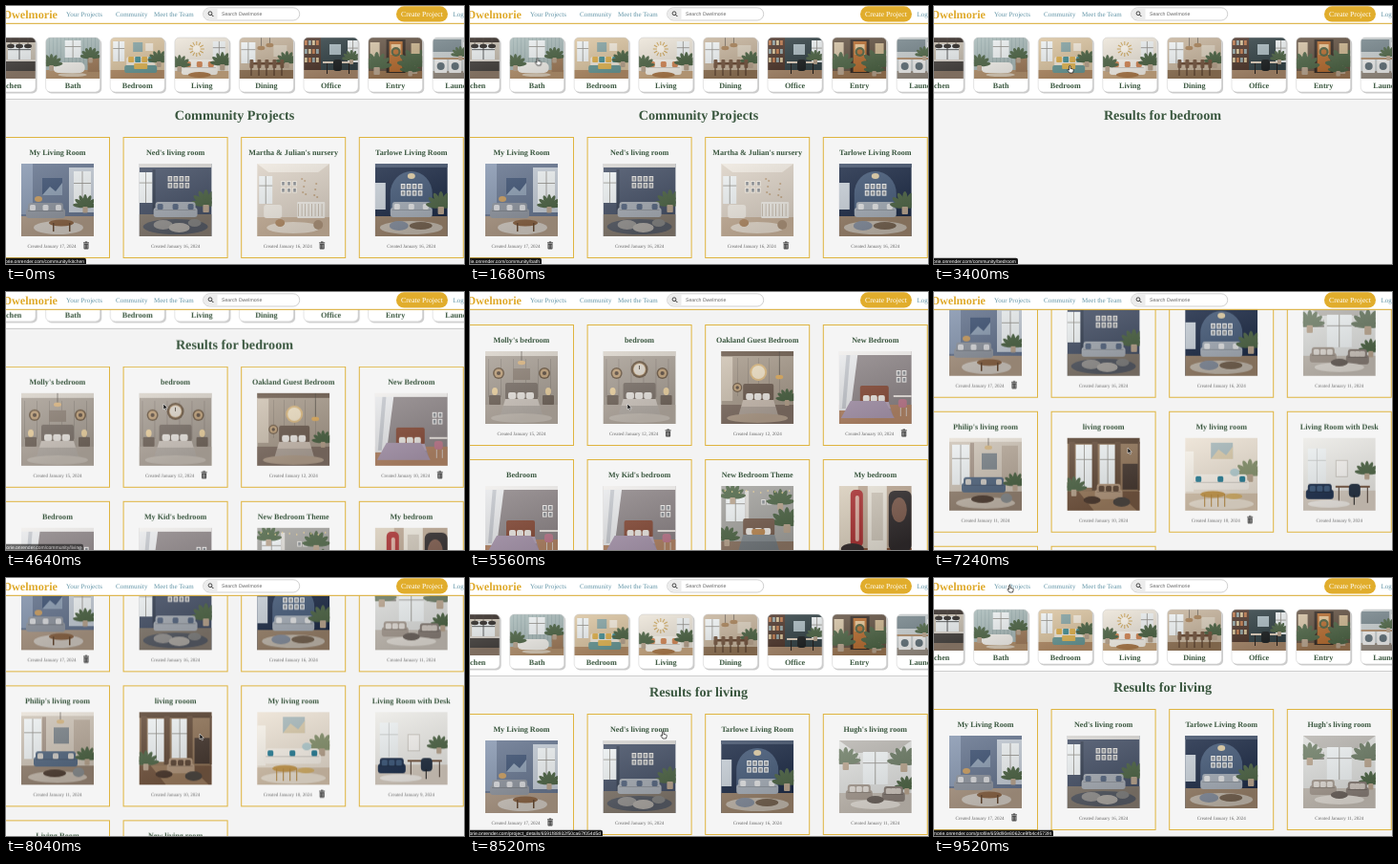
Write an HTML page that moves like this. It is 480x270 px and loops after 10000 ms.

```html
<!DOCTYPE html>
<html lang="en">
<head>
<meta charset="utf-8">
<title>Dwelmorie</title>
<style>
html, body { margin: 0; width: 100%; height: 100%; overflow: hidden; background: #f3f3f3; }
#stage { display: block; width: 480px; height: 270px; }
text { font-family: "Liberation Serif", serif; text-rendering: geometricPrecision; }
.sans { font-family: "Liberation Sans", sans-serif; }
.bold { font-weight: 700; }
.mid { text-anchor: middle; }
.end { text-anchor: end; }
.green { fill: #3a573f; }
.nav { font-size: 7px; fill: #6496a8; }
#page { animation: scroll 10s linear infinite; }
#cursor { animation: point 10s ease-in-out infinite; }
@keyframes scroll {
  0%, 43.2% { transform: translateY(0); }
  46.4% { transform: translateY(-59px); animation-timing-function: ease-out; }
  50%, 56.2% { transform: translateY(-103px); animation-timing-function: ease-in-out; }
  60.5%, 69.6% { transform: translateY(0); animation-timing-function: ease-in; }
  72.4% { transform: translateY(-153px); animation-timing-function: ease-out; }
  76%, 78% { transform: translateY(-215px); animation-timing-function: ease-in; }
  83.8% { transform: translateY(0); animation-timing-function: ease-out; }
  85.2% { transform: translateY(5px); animation-timing-function: ease-out; }
  87.5%, 100% { transform: translateY(0); }
}
@keyframes point {
  0%, 4.8% { transform: translate(-6px, 62px); }
  16% { transform: translate(70px, 58px); }
  24% { transform: translate(140px, 66px); }
  32%, 37.5% { transform: translate(143px, 66px); }
  40.2% { transform: translate(186px, 70px); }
  43.5%, 58.5% { transform: translate(165px, 118px); }
  62%, 66.5% { transform: translate(203px, 60px); }
  69.3%, 88% { transform: translate(203px, 164px); }
  94%, 100% { transform: translate(80px, 11px); }
}
</style>
</head>
<body>
<svg id="stage" viewBox="0 0 480 270"></svg>
<script>
const R = (x, y, w, h, fill, r = 0) =>
  `<rect x="${x}" y="${y}" width="${w}" height="${h}" rx="${r}" fill="${fill}"/>`;
const E = (x, y, rx, ry, fill) =>
  `<ellipse cx="${x}" cy="${y}" rx="${rx}" ry="${ry}" fill="${fill}"/>`;
const P = (d, fill) => `<path d="${d}" fill="${fill}"/>`;
const T = (x, y, size, cls, s, fill) =>
  `<text x="${x}" y="${y}" font-size="${size}" class="${cls}"${fill ? ` fill="${fill}"` : ''}>${s}</text>`;
const times = (n, f) => Array.from({ length: n }, (_, i) => f(i)).join('');

// Furniture
const room = (wall, floor, y) => R(0, 0, 76, 76, wall) + R(0, y, 76, 76 - y, floor);
const win = (x, y, w, h, bar = '#8d8a84') => R(x, y, w, h, '#eef2f3') +
  R(x + w / 2 - .4, y, .8, h, bar) + R(x, y + h / 3, w, .8, bar);
const sofa = (x, y, w, fill, pillow) => R(x, y, w, 10, fill, 3) + R(x - 2, y + 6, w + 4, 10, fill, 3) +
  R(x, y + 8, w, .8, '#0003') + times(3, i => R(x + 2 + i * (w - 10) / 2, y + 2, 6, 6, pillow, 1.5));
const plant = (x, y, s, fill = '#4f6647') => times(7, i => {
  const a = Math.PI * (1.05 + i * .15);
  return `<ellipse rx="${s / 2}" ry="${s / 6}" fill="${fill}" transform="translate(${x + Math.cos(a) * s / 2},${y + Math.sin(a) * s / 2}) rotate(${a * 57.3})"/>`;
}) + R(x - s / 5, y, s / 2.5, s / 2, '#b9a58f', 1);
const frames = (x, y, cols, rows, fill = '#e5e3df') => times(cols * rows, i => {
  const fx = x + i % cols * 6, fy = y + Math.floor(i / cols) * 7;
  return R(fx, fy, 4.6, 5.6, fill) + R(fx + 1, fy + 1, 2.6, 3.6, '#8b8f94');
});
const bed = (x, y, w, head, cover) => R(x, y, w, 18, head, 2) +
  times(3, i => R(x + 3 + i * (w - 6) / 3, y + 10, (w - 9) / 3, 7, '#eeeae5', 2)) +
  P(`M${x} ${y + 17}H${x + w}L${x + w + 5} ${y + 34}H${x - 5}Z`, cover) +
  P(`M${x - 2} ${y + 24}H${x + w + 2}L${x + w + 5} ${y + 34}H${x - 5}Z`, '#0002');
const lamp = (x, y, len, fill) => R(x - .3, y, .6, len, '#4b443d') + E(x, y + len, 4, 2.2, fill);
const disc = (x, y, r) => E(x, y, r, r, '#6d5a46') + E(x, y, r * .75, r * .75, '#c0a27c') + E(x, y, r * .35, r * .35, '#5f5044');

const guest = room('#90888a', '#b7896a', 56) + P('M0 0H20L12 62H0Z', '#e9eaec') + P('M8 0H12L7 60H3Z', '#c5c8ce') +
  R(0, 0, 76, 4, '#f0eeec') + frames(60, 20, 2, 2, '#f4f2f0') + bed(22, 36, 30, '#8a4f3c', '#b9a9be') +
  P('M12 52H48L58 70H2Z', '#ad9bb2') + R(57, 46, 19, 2, '#efe9e4') + R(62, 50, 9, 9, '#c47f93', 3) + R(64, 59, 1, 9, '#d8cdc6') + R(70, 59, 1, 9, '#d8cdc6');
const grand = round => room('#aaa197', '#b8aea4', 56) + R(0, 0, 76, 5, '#d9d3ca') +
  times(6, i => R(3 + i * 13, 8, .7, 40, '#8f867d')) + disc(14, 23, 6) + disc(62, 23, 6) + round +
  bed(21, 33, 34, '#80766e', '#d5cdc5') + R(4, 46, 12, 10, '#776b61', 1) + R(60, 46, 12, 10, '#776b61', 1) +
  E(10, 42, 3, 4, '#f0d6a5') + E(66, 42, 3, 4, '#f0d6a5') + E(38, 70, 32, 5, '#cbc3ba');

const scenes = {
  blue: room('#66758f', '#ad9986', 55) + R(0, 0, 12, 53, '#8797b0') + R(50, 4, 26, 47, '#c4ccd6') + win(55, 8, 18, 36) +
    R(22, 15, 21, 18, '#3e5273') + P('M22 33L30 24L36 29L43 20V33Z', '#8b9cb1') + sofa(7, 41, 37, '#8f959f', '#d8d9dc') +
    plant(67, 45, 13) + E(39, 67, 26, 7, '#d1cac2') + E(42, 62, 13, 3.5, '#8b6546') + R(33, 62, 1.5, 9, '#654932') + R(50, 62, 1.5, 9, '#654932') + E(18, 37, 4, 3, '#c69a5d'),
  dark: room('#465167', '#83796e', 53) + R(0, 0, 76, 4, '#d6d4d1') + win(0, 9, 14, 32) + R(14, 6, 3, 47, '#343e50') +
    frames(30, 13, 4, 2) + plant(70, 43, 16) + sofa(17, 40, 42, '#a7adb5', '#566680') + E(38, 66, 34, 8, '#575c66') +
    E(25, 64, 10, 5, '#999795') + E(42, 67, 11, 5, '#b0aca7') + E(58, 62, 7, 4, '#858584'),
  nursery: room('#dcd2c6', '#c8b29b', 56) + win(2, 13, 14, 29) + P('M0 0H76L64 9H12Z', '#eee8df') + frames(25, 18, 3, 2, '#f5efe5') +
    times(9, i => E(47 + i * 13 % 25, 16 + i * 17 % 20, 1.1, 1.1, '#c0a482')) + R(42, 40, 29, 17, '#f1eee8', 1) +
    times(8, i => R(43 + i * 3.5, 42, .8, 13, '#c4b6a5')) + R(7, 43, 19, 14, '#f0ebe3', 3) + E(38, 67, 28, 6, '#e7ddd0') + E(24, 62, 5, 4, '#b38d68') + E(64, 64, 5, 5, '#ad947b'),
  arch: room('#1e2c47', '#98816a', 55) + R(0, 0, 76, 4, '#42516a') + P('M16 50V31A22 23 0 0 1 60 31V50Z', '#465b79') +
    R(0, 20, 11, 28, '#c8d0d8') + frames(27, 21, 4, 2, '#f2f2f0') + E(38, 13, 4, 3, '#dbc9a2') + sofa(18, 40, 40, '#a6aeb8', '#e1e2e3') +
    plant(69, 45, 16) + E(38, 67, 33, 7, '#c2b9ad') + E(25, 65, 10, 5, '#858e9d') + E(48, 65, 12, 4, '#776553'),
  loft: room('#dedfdd', '#c5beb5', 55) + P('M0 0H76L58 13H18Z', '#b8b5b0') + win(25, 12, 26, 34) + R(0, 23, 22, 2, '#8d8983') + R(54, 23, 22, 2, '#8d8983') +
    times(9, i => R(1 + i * 2.5, 17, .5, 7, '#8d8983')) + plant(7, 23, 16, '#718069') + plant(68, 24, 18, '#6b7a64') + plant(71, 50, 13) +
    sofa(9, 46, 24, '#a69b91', '#e2ddd7') + sofa(47, 48, 20, '#897f78', '#d2cac2') + E(38, 67, 26, 5, '#e4dfd8') + E(38, 62, 9, 4, '#6e655f'),
  panel: room('#cfc5b8', '#988675', 56) + R(0, 0, 76, 4, '#e8e1d7') + win(3, 7, 18, 42) + R(22, 5, 4, 48, '#a7978a') + R(55, 8, 17, 36, '#b9ab9c') +
    R(34, 16, 16, 17, '#7d858b') + lamp(41, 0, 10, '#d1b27e') + sofa(15, 41, 42, '#566a83', '#d1cdc7') + plant(69, 49, 13) + E(38, 68, 31, 6, '#c9beb1') + E(35, 64, 12, 4, '#544338') + E(60, 63, 6, 5, '#8c9092'),
  tall: room('#92765a', '#765842', 56) + R(0, 0, 76, 6, '#56402f') + win(9, 7, 18, 45) + win(34, 7, 17, 45) + times(4, i => R(2 + i * 24, 4, 6, 51, '#634b39')) +
    P('M12 56H52L73 76H28Z', '#bfa07b88') + R(58, 27, 16, 27, '#483a32') + sofa(31, 48, 25, '#b59a80', '#604a3a') + plant(7, 54, 14) + E(26, 65, 9, 4, '#4e3b30') + E(57, 67, 9, 5, '#4f4944'),
  cream: room('#ece2d4', '#d7c5ae', 58) + R(27, 5, 23, 17, '#a8b9bb') + P('M27 22L35 12L43 18L50 9V22Z', '#d7c8a8') + R(0, 14, 9, 42, '#f8f3ea') +
    plant(68, 38, 16, '#87936e') + sofa(9, 38, 56, '#f7f1e8', '#287e96') + E(38, 69, 34, 6, '#eee4d5') + E(29, 59, 13, 3.5, '#c89a4d') +
    times(4, i => R(20 + i * 7, 59, 1, 13, '#b98a41')) + E(51, 61, 9, 3, '#d8b36b') + E(52, 36, 5, 4, '#b3cdd0'),
  desk: room('#ecebe7', '#d9cfc3', 55) + win(5, 11, 19, 36, '#c2c5c4') + R(34, 23, 13, 18, '#cbc7c0') + R(35, 24, 11, 16, '#f7f5f2') +
    plant(67, 37, 13) + sofa(5, 48, 25, '#1e304d', '#3b5779') + R(34, 50, 36, 2, '#765742') + R(37, 52, 1, 16, '#4b3c33') + R(67, 52, 1, 16, '#4b3c33') +
    R(48, 48, 12, 14, '#263345', 4) + R(53, 60, 1, 10, '#222') + E(27, 69, 22, 4, '#f3efea'),
  clock: grand(disc(38, 19, 9) + E(38, 19, 6, 6, '#ded7cc') + R(37.6, 15, .8, 4, '#40372f') + E(40, 66, 15, 6, '#c9c0b7')),
  medal: grand(lamp(38, 0, 12, '#dcb782') + R(29, 18, 18, 12, '#91857a')),
  sun: room('#a99c8d', '#837267', 56) + R(0, 0, 76, 5, '#6b5a4c') + R(0, 6, 12, 46, '#d0c4b4') + times(5, i => R(17 + i * 11, 7, .6, 40, '#8b7f74')) +
    disc(17, 38, 5) + E(39, 22, 9, 9, '#d9b77e') + E(39, 22, 7, 7, '#eee0c4') + lamp(61, 0, 27, '#dfac5d') + bed(23, 34, 32, '#6e5d51', '#cec1b5') + E(38, 70, 32, 5, '#b6a390') + plant(69, 51, 12),
  guest,
  theme: room('#a5a4a0', '#8e7765', 58) + win(5, 9, 20, 28) + R(25, 5, 4, 45, '#dfdcd7') + frames(42, 14, 2, 1) + plant(12, 12, 14) + plant(62, 18, 15) + plant(69, 40, 18) +
    times(10, i => E(4 + i * 7.5, 5 + i % 3, .8, .8, '#f5d893')) + bed(23, 34, 33, '#785f50', '#868d91') + R(32, 45, 14, 6, '#bd8b56', 2) + plant(6, 56, 14),
  closet: room('#b8a490', '#7c5138', 65) + R(0, 0, 20, 76, '#d8cdbb') + R(12, 4, 13, 60, '#a62e2f', 5) + R(17, 10, 4, 48, '#d5a99c', 2) +
    R(30, 0, 20, 76, '#e6e1d6') + R(34, 7, 12, 50, '#ccc4b7') + R(52, 5, 24, 63, '#302b2c', 6) + E(63, 25, 8, 13, '#7c5a4c') + E(14, 66, 12, 6, '#332b2b')
};

const small = (wall, floor, y) => R(0, 0, 57, 43, wall) + R(0, y, 57, 43 - y, floor);
const rooms = {
  Kitchen: small('#c9c0b2', '#927f6e', 34) + R(0, 0, 57, 5, '#382f2a') + win(28, 7, 24, 16, '#2d3030') + times(3, i => lamp(31 + i * 9, 0, 9, '#302c29')) + R(22, 24, 35, 11, '#4b4744') + R(20, 23, 37, 2, '#ded8d0'),
  Bath: small('#a9bab9', '#b79571', 34) + times(14, i => R(i * 4, 0, .4, 29, '#839b9b')) + win(20, 3, 17, 18) + R(8, 26, 33, 11, '#f5f3ee', 5) + R(44, 21, 12, 15, '#a58160') + plant(47, 21, 11) + plant(6, 29, 12) + E(28, 39, 15, 2, '#ded0bc'),
  Bedroom: small('#dbc5a2', '#b58f69', 34) + win(3, 4, 12, 21) + R(24, 5, 10, 10, '#87a5a5') + R(37, 6, 8, 8, '#f0e7d8') + R(17, 20, 30, 17, '#f0e8db', 3) + times(4, i => R(19 + i * 7, 20, 6, 6, i % 2 ? '#479096' : '#dfb04c', 1)) + R(15, 29, 34, 8, '#6b9b99', 2) + R(25, 27, 14, 6, '#e4b958', 1) + plant(51, 25, 12),
  Living: small('#ece5d9', '#cbaa83', 35) + times(12, i => `<path d="M23 12V4" stroke="#caa154" stroke-width="1" transform="rotate(${i * 30} 23 12)"/>`) + E(23, 12, 4, 4, '#f7f1e6') + win(40, 4, 13, 19) + sofa(9, 23, 34, '#f8f4ec', '#d58958') + plant(50, 28, 13) + plant(5, 30, 12) + E(26, 39, 12, 3, '#af7d4d'),
  Dining: small('#c7b59e', '#927557', 34) + win(2, 5, 15, 22) + R(36, 8, 14, 12, '#d9cebc') + lamp(23, 0, 11, '#a68057') + lamp(32, 0, 8, '#a68057') + plant(50, 26, 12) + R(12, 26, 34, 2.5, '#684832', 1) + times(5, i => R(12 + i * 8, 28, 1.2, 12, '#593f2e') + R(11 + i * 8, 23, 4, 9, '#755741', 1)),
  Office: small('#344347', '#a9896c', 34) + R(0, 0, 18, 34, '#4d352a') + times(12, i => R(1 + i % 4 * 4, 3 + Math.floor(i / 4) * 9, 2.8, 5, ['#b9764a', '#8fa0a0', '#d1bd94'][i % 3])) + R(27, 7, 12, 11, '#aabac0') + win(46, 3, 11, 23) + R(20, 25, 30, 2, '#dfcfbc') + R(24, 27, 1, 11, '#221d1a') + R(47, 27, 1, 11, '#221d1a') + R(31, 23, 9, 12, '#1f2324', 3) + plant(50, 23, 10),
  Entry: small('#655445', '#9b7653', 35) + R(19, 2, 20, 35, '#342a23') + R(22, 4, 14, 32, '#b76e32') + R(24, 7, 10, 11, '#e3c294') + E(29, 15, 5, 5, '#526141') + E(29, 15, 2.8, 2.8, '#b76e32') + R(2, 5, 10, 23, '#d3c1a4') + plant(9, 31, 16) + plant(48, 29, 18) + plant(44, 35, 11) + R(45, 6, 9, 11, '#ceb791'),
  Laundry: small('#c5cbcc', '#978d82', 35) + R(0, 2, 30, 13, '#75848a') + win(32, 5, 20, 17) + R(0, 21, 57, 2, '#ae8c6b') + times(3, i => R(2 + i * 15, 23, 13, 14, '#eeeeed', 1) + E(8.5 + i * 15, 30, 4, 4, '#617078')) + plant(29, 19, 10)
};

const photo = (x, y, w, h, art) =>
  `<svg x="${x}" y="${y}" width="${w}" height="${h}" viewBox="0 0 ${w} ${h}">${art}${R(0, 0, w, h, 'url(#light)')}</svg>`;

const trash = (x, y) => R(x - 3, y - 3.6, 6, 1, '#333') + R(x - 1.2, y - 4.5, 2.4, 1, '#333') +
  R(x - 2.5, y - 2.2, 5, 5.6, '#444', .7) + times(3, i => R(x - 1.6 + i * 1.3, y - 1.3, .5, 3.8, '#bbb'));

const card = ([title, day, art, own], i) => {
  const x = -1 + i % 4 * 123.6, y = 137 + Math.floor(i / 4) * 141;
  return `<rect x="${x + .5}" y="${y + .5}" width="109" height="126" fill="#f5f5f5" stroke="#dfb43f"/>` +
    T(x + 55, y + 19, 8.15, 'bold mid green', title) + photo(x + 17, y + 28, 76, 76, scenes[art]) +
    T(x + (own ? 49 : 55), y + 115.5, 5, 'mid', `Created January ${day}, 2024`, '#666') + (own ? trash(x + 85, y + 114) : '');
};

const category = ([name, art], i) => `<g transform="translate(${-26 + i * 67.6},33)">` +
  R(1, 1.4, 57.6, 57, '#0003', 5) + R(0, 0, 57, 57, '#fff', 5) +
  `<g clip-path="url(#round)">${photo(0, 0, 57, 43, art)}</g>` + T(28.5, 53, 8.15, 'bold mid green', name) +
  '<rect width="57" height="57" rx="5" fill="none" stroke="#c9c9c9" stroke-width=".5"/></g>';

// Shows a group between two points of the loop, in percent
let rules = '', shown = 0;
const show = (body, ...spans) => {
  const name = 'show' + shown++;
  let keys = spans[0][0] ? '0%{opacity:0}' : '';
  for (const [a, b, fade = .01] of spans) {
    if (a) keys += `${a - .01}%{opacity:0}`;
    keys += `${a}%,${b === 100 ? 100 : b - fade}%{opacity:1}`;
    if (b < 100) keys += `${b}%{opacity:0}`;
  }
  if (spans[spans.length - 1][1] < 100) keys += '100%{opacity:0}';
  rules += `@keyframes ${name}{${keys}}`;
  return `<g style="animation:${name} 10s linear infinite">${body}</g>`;
};

const heading = s => T(239.5, 119, 14.2, 'bold mid green', s);
const status = (right, path, ...span) => show(
  R(-200, 263.7, right + 200, 10, '#151515', 2) +
  T(right - 2, 269, 5, 'sans end', 'https://dwelmorie.onrender.com/' + path, '#fff'), span);

const community = [
  ['My Living Room', 17, 'blue', 1], ["Ned's living room", 16, 'dark'],
  ["Martha &amp; Julian's nursery", 16, 'nursery', 1], ['Tarlowe Living Room', 16, 'arch']];
const bedrooms = [
  ["Molly's bedroom", 15, 'medal'], ['bedroom', 12, 'clock', 1], ['Oakland Guest Bedroom', 12, 'sun'], ['New Bedroom', 10, 'guest', 1],
  ['Bedroom', 10, 'guest'], ["My Kid's bedroom", 10, 'guest'], ['New Bedroom Theme', 10, 'theme'], ['My bedroom', 9, 'closet']];
const living = [
  community[0], community[1], community[3], ["Hugh's living room", 11, 'loft'],
  ["Philip's living room", 11, 'panel'], ['living rooom', 10, 'tall'], ['My living room', 10, 'cream', 1], ['Living Room with Desk', 9, 'desk'],
  ['Living Room', 9, 'panel'], ['New living room', 8, 'cream']];
const list = cards => cards.map(card).join('');

const page = R(0, -20, 480, 117, '#fff') + R(0, 97, 480, .8, '#c4c4c4') +
  Object.entries(rooms).map(category).join('') +
  show(heading('Community Projects') + list(community), [0, 32.6]) +
  show(heading('Results for bedroom'), [32.6, 65]) + show(list(bedrooms), [35.6, 65]) +
  show(heading('Results for living'), [65, 100]) + show(list(living), [67, 100]);

const nav = R(0, 0, 480, 18, '#fff') + R(0, 17.8, 480, 1.1, '#dcb140') +
  T(54, 13, 12.2, 'bold end', 'Dwelmorie', '#dfaa2c') +
  T(63, 11, 7, 'nav', 'Your Projects') + T(115, 11, 7.1, 'nav', 'Community') + T(155, 11, 7, 'nav', 'Meet the Team') +
  '<rect x="206.7" y="1.8" width="101" height="13.2" rx="6.6" fill="#fff" stroke="#bbb" stroke-width=".7"/>' +
  P('M221.5 2.2H213.3A6.2 6.2 0 0 0 213.3 14.6H221.5Z', '#ececec') +
  '<path d="M215.6 9.2L217.4 11" stroke="#222" stroke-width="1"/><circle cx="214" cy="7.7" r="1.9" fill="none" stroke="#222" stroke-width=".8"/>' +
  T(226, 10.4, 5.2, 'sans', 'Search Dwelmorie', '#666') +
  R(409, .3, 54, 16.2, '#e1ad2c', 8.1) + T(436, 11, 7.7, 'mid', 'Create Project', '#fff') + T(468.5, 11, 7, 'nav', 'Log In');

const hand = '<path d="M-1.4 -3.2Q-.6 -4 .1 -3.2V-.6L2.6 0Q3.4 .4 3.2 1.5L2.5 4H-1L-3 1.2Q-3.2 .3 -2.3 .4L-1.4 1.1Z" fill="#fff" stroke="#111" stroke-width=".7"/>';
const arrow = '<path d="M0 -1V5L1.4 3.8L2.4 6L3.4 5.5L2.5 3.4H4.3Z" fill="#111" stroke="#fff" stroke-width=".5"/>';

document.getElementById('stage').innerHTML =
  `<defs><linearGradient id="light" x2=".4" y2="1"><stop stop-color="#fff" stop-opacity=".14"/><stop offset="1" stop-opacity=".14"/></linearGradient>
  <clipPath id="round"><rect width="57" height="57" rx="5"/></clipPath></defs>` +
  R(0, 0, 480, 270, '#f3f3f3') + `<g id="page">${page}</g>` + nav +
  status(84, 'community/kitchen', 0, 11) + status(75, 'community/bath', 11, 20.5) +
  status(88, 'community/bedroom', 20.5, 38.6) + status(81, 'community/living', 39.2, 47.4, 1.6) +
  status(81, 'community/living', 61, 68) +
  status(139, 'project_details/6591f88932f50ca67f054d5d', 84, 89) +
  status(125, 'profile/659d90e8062ce9fb4c4573f4', 92.6, 100) +
  `<g id="cursor">${show(hand, [0, 41], [60.7, 67.8], [84, 89], [92.6, 100])}${show(arrow, [41, 60.7], [67.8, 84], [89, 92.6])}</g>`;

const style = document.createElement('style');
style.textContent = rules;
document.head.append(style);
</script>
</body>
</html>
```
